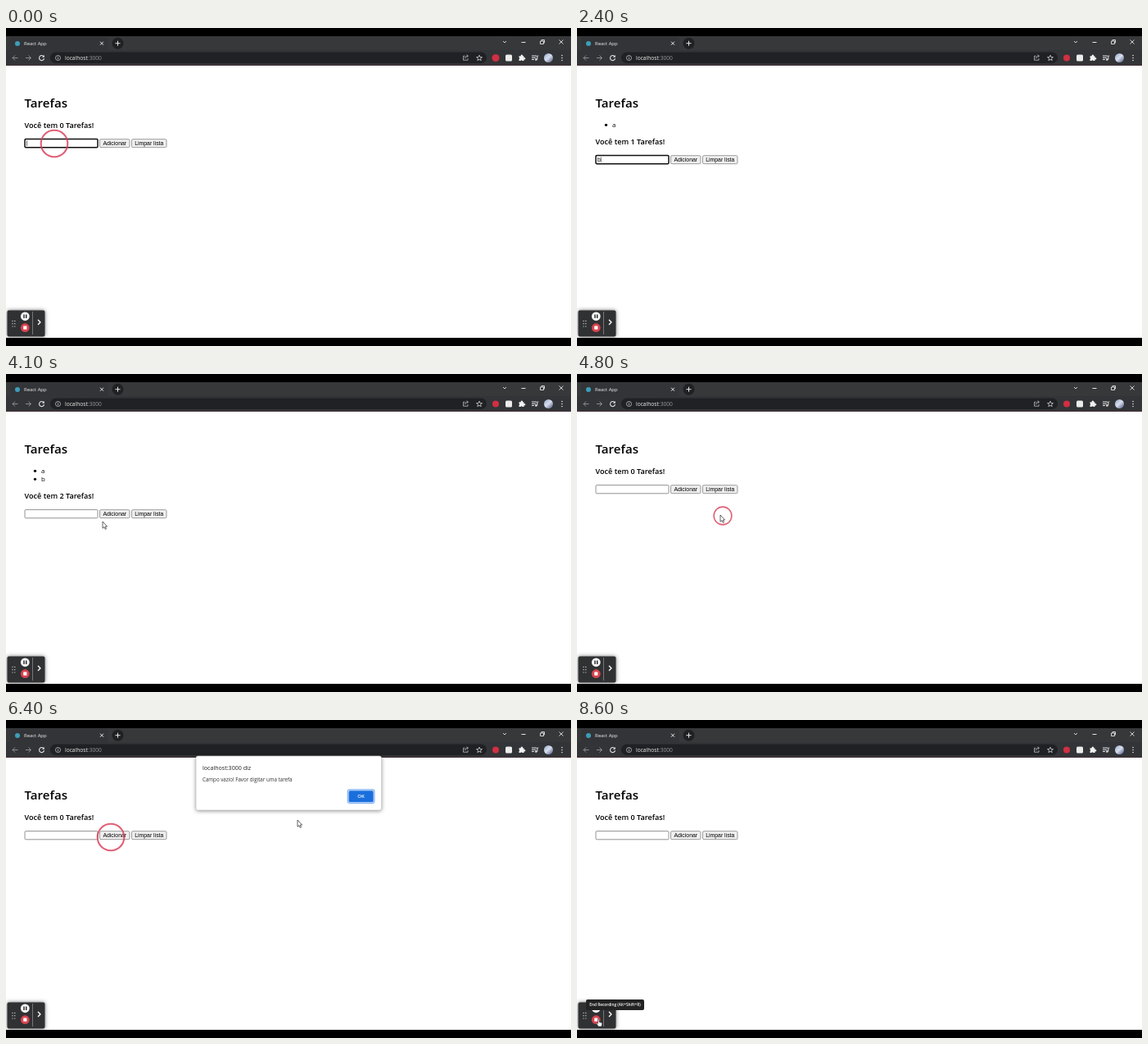
Animation of 690x388 px, one loop 8.7 s. Source, as an HTML page with a canvas:

```html
<!DOCTYPE html>
<html lang="pt">
<head>
<meta charset="utf-8">
<title>Tarefas</title>
<style>
html, body { margin: 0; width: 100%; height: 100%; overflow: hidden; background: #000; }
canvas { display: block; width: 690px; height: 388px; }
</style>
</head>
<body>
<canvas id="stage" width="690" height="388"></canvas>
<script>
const ctx = document.getElementById('stage').getContext('2d');
const LOOP = 8700, STEP = 100;
const SANS = '"Open Sans", "Noto Sans", sans-serif';
const ARIAL = '"Liberation Sans", Arial, sans-serif';

// time, x, y of the pointer tip
const pointerPath = [
  [0, 60, 141], [500, 60, 141], [700, 95, 146], [1000, 126, 140], [1200, 126, 140],
  [1300, 106, 143], [1600, 62, 160], [2400, 62, 160], [2600, 100, 171], [2900, 136, 159],
  [3500, 136, 159], [3800, 128, 183], [4100, 118, 180], [4500, 175, 172], [4800, 175, 172],
  [5200, 112, 216], [5600, 150, 182], [5800, 146, 176], [6000, 128, 142], [6200, 128, 142],
  [6300, 256, 178], [6400, 356, 122], [6500, 356, 122], [6700, 390, 106], [7100, 435, 93],
  [7300, 435, 93], [7500, 356, 125], [7600, 356, 125], [8000, 160, 258], [8300, 26, 365], [8700, 26, 365]
];
const clicks = [
  { x: 59, y: 141, from: 0, release: 100 },
  { x: 126, y: 140, from: 1200, release: 1100 },
  { x: 62, y: 160, from: 1700, release: 1900 },
  { x: 137, y: 159, from: 3200, release: 3400 },
  { x: 178, y: 173, from: 4600, release: 4700 },
  { x: 128, y: 143, from: 6100, release: 7200 }
];
const between = (t, a, b) => t >= a && t < b;

function pointerAt(t) {
  const i = pointerPath.findIndex(k => k[0] > t);
  const [t0, x0, y0] = pointerPath[i - 1], [t1, x1, y1] = pointerPath[i];
  const p = (t - t0) / (t1 - t0);
  return { x: x0 + (x1 - x0) * p, y: y0 + (y1 - y0) * p };
}

function rect(x, y, w, h, color) {
  ctx.fillStyle = color;
  ctx.fillRect(x, y, w, h);
}
function roundBox(x, y, w, h, r, fill, stroke, width = 1) {
  ctx.beginPath();
  ctx.roundRect(x, y, w, h, r);
  if (fill) { ctx.fillStyle = fill; ctx.fill(); }
  if (stroke) { ctx.strokeStyle = stroke; ctx.lineWidth = width; ctx.stroke(); }
}
function disc(x, y, r, color) {
  ctx.fillStyle = color;
  ctx.beginPath();
  ctx.arc(x, y, r, 0, Math.PI * 2);
  ctx.fill();
}
function circle(x, y, r, color, width) {
  ctx.strokeStyle = color;
  ctx.lineWidth = width;
  ctx.beginPath();
  ctx.arc(x, y, r, 0, Math.PI * 2);
  ctx.stroke();
}
function path(d, x, y, stroke, width = 1, fill) {
  const shape = new Path2D(d);
  ctx.save();
  ctx.translate(x, y);
  ctx.lineJoin = 'round';
  if (fill) { ctx.fillStyle = fill; ctx.fill(shape); }
  if (stroke) { ctx.strokeStyle = stroke; ctx.lineWidth = width; ctx.stroke(shape); }
  ctx.restore();
}
function text(str, x, y, size, color, weight = 400, family = SANS, align = 'left') {
  ctx.font = `${weight} ${size}px ${family}`;
  ctx.fillStyle = color;
  ctx.textAlign = align;
  ctx.fillText(str, x, y);
  return ctx.measureText(str).width;
}
function shadow(color, blur, dy) {
  ctx.shadowColor = color;
  ctx.shadowBlur = blur;
  ctx.shadowOffsetY = dy;
}

function drawBrowser(t) {
  const light = '#e3e4e6', grey = '#8b8d91';
  rect(0, 0, 690, 388, '#000');
  rect(0, 10, 690, 18, '#37383a');
  roundBox(5, 11, 120, 20, 4, '#333437');
  rect(0, 27, 690, 18, '#333437');
  rect(0, 45, 690, 1, '#4a3540');
  rect(0, 46, 690, 332, '#fff');

  disc(14, 19, 3, '#3c9db8');
  text('React App', 22, 21, 5.9, '#f1f1f1');
  path('M-2-2L2 2M2-2L-2 2', 117, 18.7, light);
  disc(136.5, 18.7, 7, '#202124');
  path('M-3 0H3M0-3V3', 136.5, 18.7, light);

  path('M-2-1L0 1L2-1', 609, 17, light, 0.9);
  path('M-2.5 0H2.5', 632, 17.5, light);
  path('M-2.5-1H1.5V2.5H-2.5ZM-1-1V-2.5H2.5V1H1.5', 655, 17, light, 0.9);
  path('M-2.5-2.5L2.5 2.5M2.5-2.5L-2.5 2.5', 678, 17, light, 0.9);

  path('M3.5 0H-3M0-3L-3 0L0 3', 11, 36.5, grey);
  path('M-3.5 0H3M0-3L3 0L0 3', 27.5, 36.5, grey);
  path('M2.4-1.8A3 3 0 1 0 3 .6', 43.5, 36.5, light, 1.1);
  path('M3.3-3.6V-.7H.4Z', 43.5, 36.5, null, 1, light);

  roundBox(54, 29.5, 533, 13.5, 6.75, '#202124');
  circle(63.5, 36.5, 3, '#c4c6c9', 0.8);
  path('M0-.4V1.7M0-1.8V-1', 63.5, 36.5, '#c4c6c9', 0.8);
  const host = text('localhost', 72, 38.8, 6.67, '#eee');
  text(':3000', 72 + host, 38.8, 6.67, '#96999d');
  path('M-1-2H-3V3H2.5V1M-1 1C-1-1 0-2 2.5-2M1-3.5L3-2L1-.3', 561.5, 36.2, '#bfc1c4', 0.8);
  path('M0-3.4L1-1L3.5-.9L1.5.7L2.2 3.1L0 1.8L-2.2 3.1L-1.5.7L-3.5-.9L-1-1Z', 578, 36.5, '#d0d2d4', 0.8);

  disc(598, 36.5, t < 200 ? 4.5 : 4, '#d12f42');
  roundBox(610, 32.5, 8, 8, 1.5, '#ececec');
  path('M-3.5-2H-1.2A1.2 1.2 0 1 1 1-2H2.5V0A1.2 1.2 0 1 1 2.5 2V3.7H.6A1.2 1.2 0 0 0-1.6 3.7H-3.5V1.6A1.1 1.1 0 0 0-3.5-.4Z', 630, 36.3, null, 1, '#f2f2f2');
  path('M-4-2.5H2M-4-.2H1M-4 2H-1M2.8 2V-2.5H4.2', 646, 36.5, light);
  disc(1.8 + 645.5, 38.5, 1.3, light);
  const sky = ctx.createLinearGradient(657, 31, 667, 42);
  sky.addColorStop(0, '#8fa5cb');
  sky.addColorStop(0.5, '#d9dfed');
  sky.addColorStop(1, '#56608b');
  disc(662.5, 36.5, 5.5, sky);
  for (const dy of [-3, 0, 3]) disc(679, 36.5 + dy, 0.8, light);
}

function drawButton(label, x, y, w, hovered) {
  roundBox(x + 0.5, y - 4.7, w - 1, 10, 1.5, hovered ? '#e3e3e3' : '#efefef', '#858585', 0.8);
  text(label, x + w / 2, y + 2.7, 6.9, '#000', 400, ARIAL, 'center');
}

function drawPage(t, pointer) {
  const items = between(t, 1200, 3500) ? ['a'] : between(t, 3500, 4800) ? ['a', 'b'] : [];
  const shift = items.length ? 10 + items.length * 10 : 0;
  const fieldY = 140.4 + shift;
  const focused = t < 1200 || between(t, 1700, 3200);
  const value = between(t, 500, 1200) ? 'a' : between(t, 2300, 3500) ? 'b' : '';

  text('Tarefas', 22.5, 97, 15.1, '#000', 600);
  items.forEach((item, i) => {
    disc(35.5, 118.3 + i * 10, 1.6, '#000');
    text(item, 43, 121 + i * 10, 7.8, '#000');
  });
  text(`Você tem ${items.length} Tarefas!`, 22.5, 122 + shift, 9.1, '#000', 600);

  roundBox(23, fieldY - 4.8, 89, 10.2, 1.2, '#fff', focused ? '#101010' : '#777', focused ? 1.5 : 0.8);
  const typed = text(value, 25, fieldY + 2.7, 6.9, '#000', 400, ARIAL);
  if (focused) rect(25 + (value ? typed : 0), fieldY - 3, 0.7, 6.5, '#333');

  const over = (x, w) => t < 6200 && pointer.x > x && pointer.x < x + w && Math.abs(pointer.y - fieldY) < 5.5;
  drawButton('Adicionar', 114, fieldY, 37.5, over(114, 37.5));
  drawButton('Limpar lista', 153, fieldY, 43.5, over(153, 43.5));
  return fieldY;
}

function drawAlert() {
  ctx.save();
  shadow('rgba(0,0,0,.45)', 5, 1);
  roundBox(232, 44, 226.5, 66, 2.5, '#fff');
  ctx.restore();
  roundBox(232, 44, 226.5, 66, 2.5, null, '#c4c4c4', 0.6);
  text('localhost:3000 diz', 240, 60.5, 7.1, '#222');
  text('Campo vazio! Favor digitar uma tarefa', 240, 74.7, 6.2, '#333');
  roundBox(417.3, 85, 32.6, 16.5, 2.5, '#fff', '#8ab6f3', 1.3);
  roundBox(418.5, 86.2, 30.2, 14.1, 1.5, '#1a6fdc');
  text('OK', 433.5, 95.4, 6, '#fff', 600, SANS, 'center');
}

function drawRecorder(t) {
  ctx.save();
  shadow('rgba(0,0,0,.55)', 5, 0);
  roundBox(1.5, 344.5, 46, 32, 2, '#303133');
  ctx.restore();
  for (const x of [8, 10.8]) for (const y of [357.5, 360.8, 364.1]) disc(x, y, 0.7, '#ccc');
  disc(23.3, 351.8, 5.4, '#f4f4f4');
  rect(21.3, 349.6, 1.4, 4.4, '#222');
  rect(24, 349.6, 1.4, 4.4, '#222');
  disc(23.3, 365.7, 5.4, '#d8434f');
  roundBox(21.2, 363.6, 4.2, 4.2, 0.5, '#fff');
  rect(32, 346, 0.8, 28, '#8a8a8a');
  path('M-1.5-3L1.5 0L-1.5 3', 40.5, 359, '#fff', 1.4);
  if (t >= 8400) {
    roundBox(11, 341, 71, 13, 2, '#232323');
    text('End Recording (Alt+Shift+R)', 46.5, 349.3, 4.75, '#fff', 600, SANS, 'center');
  }
}

function drawRings(t) {
  for (const { x, y, from, release } of clicks) {
    const r = 16.3 * (1 - Math.max(0, t - release) / 300);
    if (t >= from && r > 0.5) circle(x, y, r, 'rgba(218,62,88,.82)', 0.6 + r * 0.09);
  }
}

function drawPointer({ x, y }, fieldY, t) {
  const inField = x < 112 && Math.abs(y - fieldY) < 5.5;
  if (inField && t < 6200) return;
  if (t >= 8300) {
    path('M-.6.4C-.6-.8 1-.8 1 .4V3.5L4 4.2Q5 4.5 4.7 6L4 9H.2L-2.3 5.6C-2.6 4.8-1.6 4.4-.6 5.5Z', x, y, '#222', 0.6, '#fff');
  } else {
    path('M0 0V8.3L1.9 6.6L3.2 9.4L4.5 8.8L3.2 6.1H5.6Z', x, y, '#222', 0.7, '#fff');
  }
}

function draw(now) {
  const t = Math.floor((now % LOOP) / STEP) * STEP;
  const pointer = pointerAt(t);
  drawBrowser(t);
  const fieldY = drawPage(t, pointer);
  if (between(t, 6200, 7300)) drawAlert();
  drawRecorder(t);
  drawRings(t);
  drawPointer(pointer, fieldY, t);
}

const start = performance.now();
function tick() {
  draw(performance.now() - start);
  requestAnimationFrame(tick);
}
tick();
</script>
</body>
</html>
```
